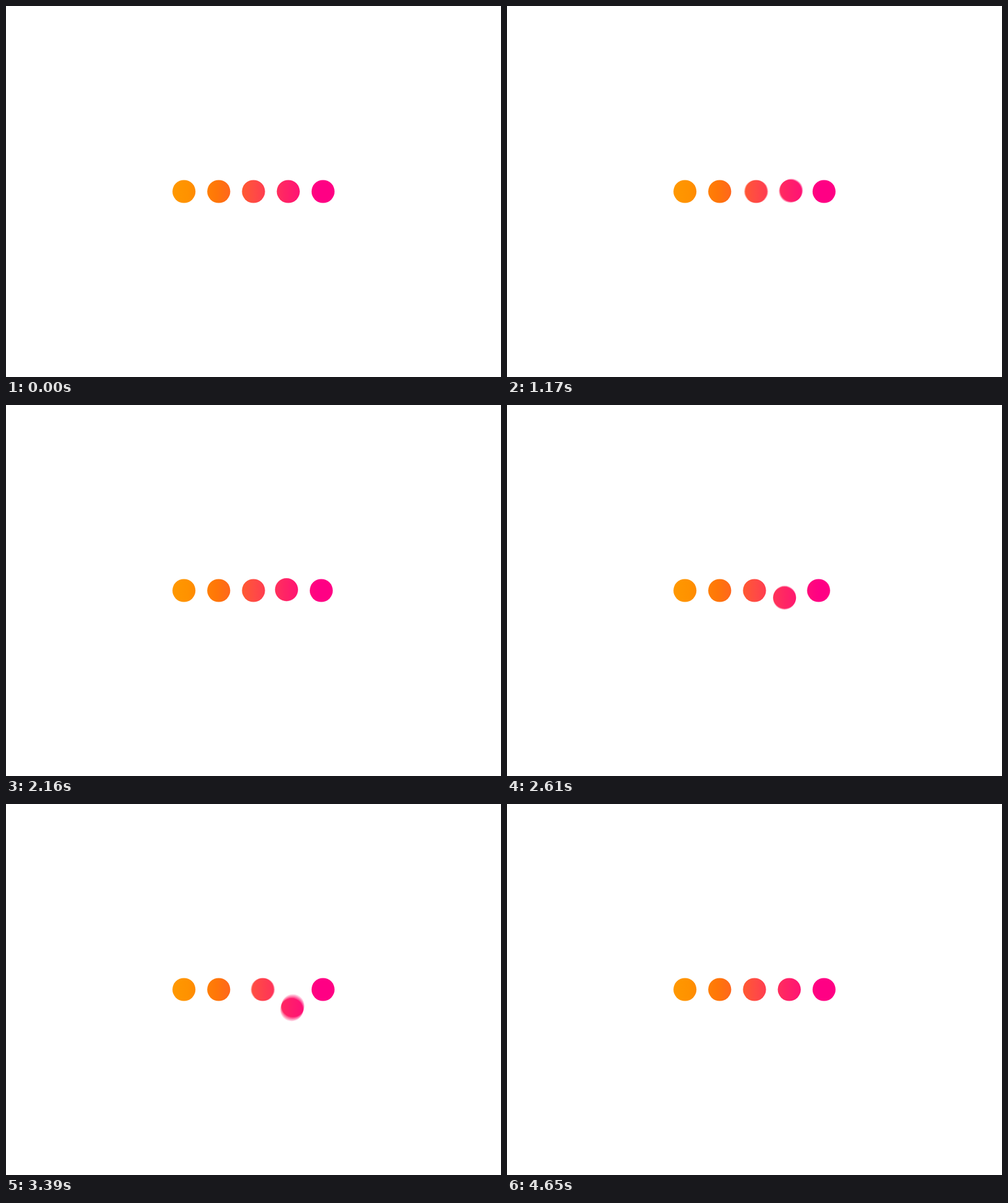
An HTML page with a canvas that plays this animation: 800x600 px, repeating every 4680 ms.

```html
<!DOCTYPE html>
<html lang="en">
<head>
<meta charset="utf-8">
<title>Leapfrog dots</title>
<style>
  html, body { margin: 0; height: 100%; overflow: hidden; background: #fff; }
  canvas { display: block; }
</style>
</head>
<body>
<canvas width="800" height="600"></canvas>
<script>
const ctx = document.querySelector('canvas').getContext('2d');
const LOOP = 4680, HALF = LOOP / 2, STEP = 30;
const GAP = 56.2, RADIUS = 18.6, CX = 400, CY = 300;
const BLUR_SAMPLES = 5, SHUTTER = 14, SHUTTER_MID = 18;

const gradient = ctx.createLinearGradient(270, 0, 504, 0);
[[0, '#ff9800'], [0.1, '#ff9200'], [0.3, '#ff7608'], [0.56, '#ff4b44'],
 [0.8, '#ff1f6a'], [1, '#ff0084']].forEach(([at, color]) => gradient.addColorStop(at, color));

const smooth = x => x * x * (3 - 2 * x);
const sine = x => (1 - Math.cos(Math.PI * x)) / 2;
const ease = x => (smooth(x) + sine(x)) / 2;

function dot(x, y) {
  ctx.beginPath();
  ctx.arc(x, y, RADIUS, 0, 2 * Math.PI);
  ctx.fill();
}

// One dot slides along the row; each neighbour it meets swings around it.
// The way back is the same motion turned by 180 degrees.
function drawDots(time) {
  const t = time % LOOP;
  const side = t < HALF ? 1 : -1;
  const travel = 4 * ease((t % HALF) / HALF);
  const slot = Math.min(3, Math.floor(travel));
  const angle = Math.PI * smooth(travel - slot);
  const place = (column, row = 0) =>
    dot(CX + side * GAP * (column - 2), CY + side * GAP * row);

  for (let i = 0; i < 5; i++) {
    if (i !== slot && i !== slot + 1) place(i);
  }
  place(travel);
  place(travel + Math.cos(angle), -Math.sin(angle));
}

function render(now) {
  const start = Math.floor((now % LOOP) / STEP) * STEP + SHUTTER_MID;
  ctx.clearRect(0, 0, 800, 600);

  // Motion blur: sum several faint exposures, then tint by position.
  ctx.globalCompositeOperation = 'lighter';
  ctx.globalAlpha = 1 / BLUR_SAMPLES;
  ctx.fillStyle = '#000';
  for (let i = 0; i < BLUR_SAMPLES; i++) {
    drawDots(start + SHUTTER * (i / (BLUR_SAMPLES - 1) - 0.5));
  }
  ctx.globalCompositeOperation = 'source-in';
  ctx.globalAlpha = 1;
  ctx.fillStyle = gradient;
  ctx.fillRect(0, 0, 800, 600);
  ctx.globalCompositeOperation = 'source-over';
}

let origin;
function tick(now) {
  origin ??= now;
  render(now - origin);
  requestAnimationFrame(tick);
}
requestAnimationFrame(tick);
</script>
</body>
</html>
```
